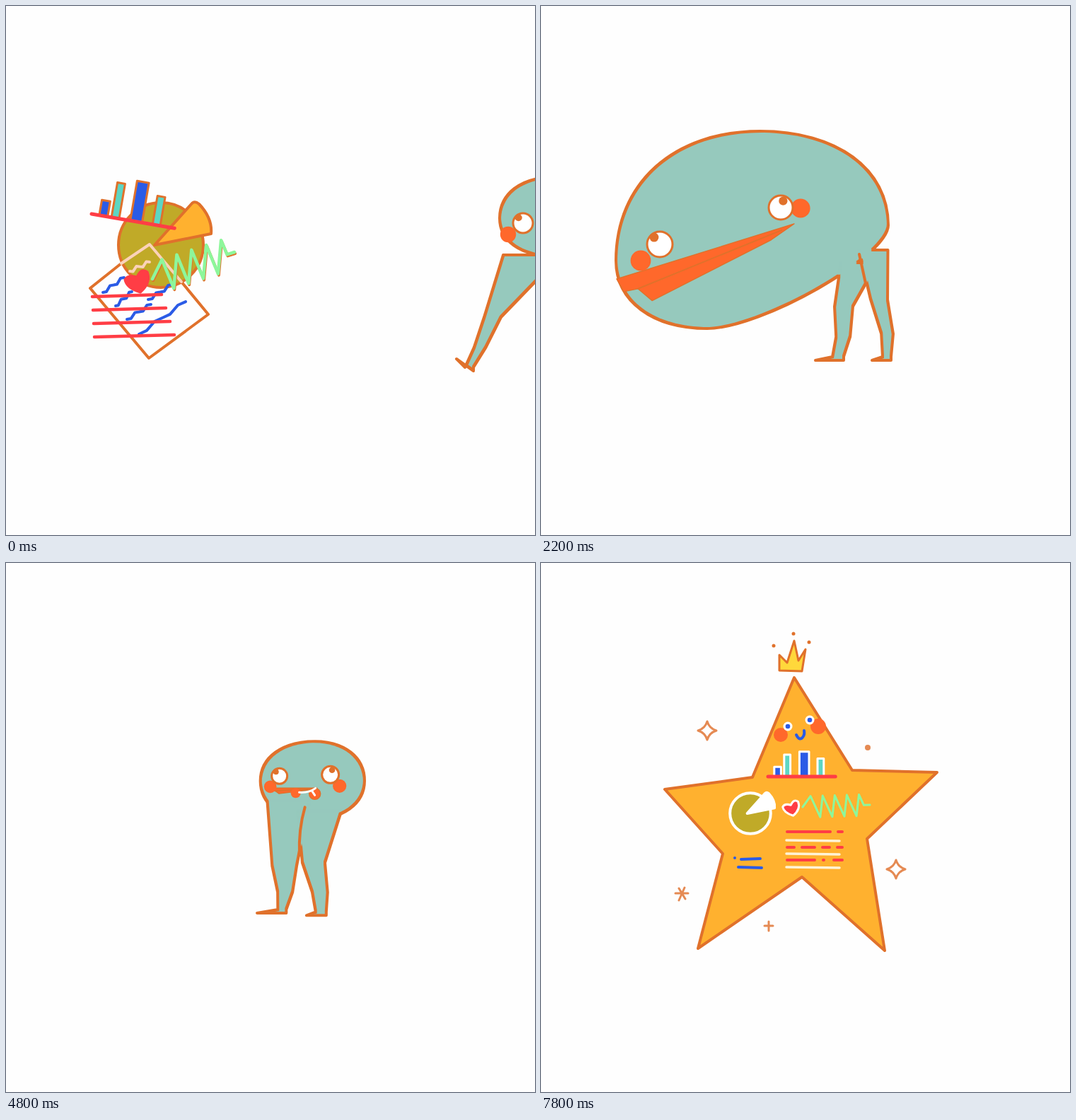
These frames come from a looping animation (748x748 px, 8000 ms). An HTML page:

```html
<!DOCTYPE html>
<html lang="en">
<head>
<meta charset="utf-8">
<title>Data to star</title>
<style>
html, body { margin: 0; width: 100%; height: 100%; overflow: hidden; background: #fefefe; }
svg { display: block; width: 100vw; height: 100vh; }
path, circle { vector-effect: non-scaling-stroke; }
</style>
</head>
<body>
<svg viewBox="0 0 748 748" stroke-linecap="round" stroke-linejoin="round">
  <filter id="inset" filterUnits="userSpaceOnUse" x="-400" y="-100" width="1600" height="1000" color-interpolation-filters="sRGB">
    <feMorphology operator="erode" radius="2"/>
  </filter>
  <g id="scene"></g>
</svg>
<script>
const LINE = '#e0712b', SOFT = '#e58a53', SKIN = '#96c9bd', HOT = '#ff682b', STAR = '#ffb12f', OLIVE = '#c0aa28',
  BLUE = '#2b5be6', RED = '#ff3d45', GREEN = '#8df79b', MINT = '#5dd6c3', PINK = '#fbd2b9', CREAM = '#fff3d6';
const STEP = 200, STEPS = 40;
const scene = document.getElementById('scene');

// Drawing helpers
const mix = (a, b, p) => a + (b - a) * p;
const path = (d, stroke, w = 4, fill = 'none') =>
  `<path d="${d}" stroke="${stroke}" stroke-width="${w}" fill="${fill}"/>`;
const line = (s, stroke, w) => path('M' + s, stroke, w);
const shape = (s, fill, stroke = 'none', w = 4) => path(`M${s}Z`, stroke, w, fill);
const dot = (x, y, r, fill, stroke = 'none', w = 3) =>
  `<circle cx="${x}" cy="${y}" r="${r}" fill="${fill}" stroke="${stroke}" stroke-width="${w}"/>`;
const group = (inner, transform) => `<g transform="${transform}">${inner}</g>`;
const about = (x, y, s, dy = 0) => `translate(${x} ${y + dy}) scale(${s}) translate(${-x} ${-y})`;

function scribble(x1, y1, x2, y2, amp = 3) {
  return Array.from({ length: 7 }, (_, i) =>
    [mix(x1, x2, i / 6), mix(y1, y2, i / 6) + amp * Math.sin(i * 2.1)]).join(' ');
}
function pulse(x1, y1, x2, y2, amp, beats = 5) {
  const out = [[x1, y1]], gap = (x2 - x1) * .18;
  const add = (x, dy) => out.push([x, mix(y1, y2, (x - x1) / (x2 - x1)) + dy]);
  for (let i = 0; i < beats; i++) {
    const x = x1 + gap * (.65 + i);
    add(x, -amp);
    if (i < beats - 1) add(x + gap * .8, amp);
  }
  add(x2 - gap * .5, 0);
  return [...out, [x2, y2]].join(' ');
}

// Infographics, shared by the loose pile and the star
const bars = (edge, w) => [[17, 22, 12, BLUE], [34, 50, 11, MINT], [64, 57, 17, BLUE], [93, 41, 11, MINT]]
  .map(([x, h, b, fill]) => shape(`${x - b / 2},0v${-h}h${b}v${h}`, fill, edge, w)).join('') + line('0,0 119,0', RED, 5);
const pie = (edge, wedge) => dot(0, 0, 60, OLIVE, edge, 4) +
  path('M-9 0L44 -59Q48 -63 54 -58Q73 -38 71 -16Z', edge, 4, wedge);
const heart = edge => path('M4 18Q-16 12 -18 0Q-14 -8 -1 -4Q5 -18 14 -11Q20 4 4 18Z', edge, 3, RED);

const beat = pulse(207, 386, 323, 348, 23);
const notes = [[137, 405, 167, 384], [155, 424, 178, 404], [171, 443, 205, 422], [201, 415, 235, 394], [188, 464, 254, 418]];
const data = [
  group(pie(LINE, STAR), 'translate(219 338)'),
  line('163,364 119,399 202,498 286,436 248,390', LINE),
  line('163,364 203,337 248,390', PINK),
  line(scribble(175, 375, 203, 362), PINK),
  ...notes.map(n => line(scribble(...n), BLUE, 4)),
  ...[0, 1, 2, 3].map(i => line(`${122 + i},${411 + 19 * i} ${220 + 6 * i},${408 + 19 * i}`, RED, 4.5)),
  group(heart(RED), 'translate(186 387)'),
  group(line(beat, LINE, 4), 'translate(1 2)'), line(beat, GREEN, 4.5),
  group(bars(LINE, 3), 'translate(121 294) rotate(9.8)')
].join('');

const textRow = i => i % 2
  ? line(`347,${381 + 10 * i} 423,${382 + 10 * i}`, CREAM, 3.5)
  : `<path d="M348 ${381 + 10 * i}L425 ${380 + 10 * i}" stroke="${RED}" stroke-width="4" stroke-dasharray="${i === 2 ? '12 9' : '${0}'}"/>`;
const redRow = (y, dashes) =>
  `<path d="M348 ${y}H426" fill="none" stroke="${RED}" stroke-width="4" stroke-dasharray="${dashes}"/>`;
const bigStar = [
  shape('358,162 440,293 560,296 461,390 486,548 369,444 222,545 257,411 175,320 299,303', STAR, LINE),
  dot(339, 243, 10, HOT), dot(392, 231, 11, HOT),
  ...[[349, 231], [380, 222]].map(([x, y]) => dot(x, y, 6.5, '#fff') + dot(x, y, 3.3, BLUE)),
  path('M361 243Q366 253 371 245Q373 242 372 237', BLUE, 4),
  group(bars('#fff', 3), 'translate(321 302) scale(.8 .62)'),
  group(pie('#fff', '#fff'), 'translate(296 354) scale(.48)'),
  group(heart('#fff'), 'translate(354 345) scale(.68)'),
  line(pulse(370, 345, 465, 342, 15), GREEN, 3),
  ...[0, 1, 2].map(i => line(`347,${392 + 19 * i} 422,${393 + 19 * i}`, CREAM, 3.5)),
  redRow(380, '61 11'), redRow(402, '10 11 18 11'), redRow(420, '39 12 1 14'),
  line('274,417 274,417', BLUE, 4), line('283,419 310,418', BLUE, 4), line('279,430 312,431', BLUE, 4)
].join('');

function glint(x, y, r = 13) {
  const c = r * .23;
  return path(`M0 ${-r}Q${c} ${-c} ${r} 0Q${c} ${c} 0 ${r}Q${-c} ${c} ${-r} 0Q${-c} ${-c} 0 ${-r}Z`, SOFT, 3)
    .replace('<path', `<path transform="translate(${x} ${y})"`);
}
const glory = shape('337,152 337,130 348,141 358,110 364,138 374,122 369,153', '#ffd83b', LINE, 3) +
  dot(357, 100, 2.5, LINE) + dot(379, 112, 2.5, LINE) + dot(329, 117, 2.5, LINE) +
  glint(235, 237) + glint(502, 433) + dot(462, 261, 4, SOFT) +
  path('M190 467H208M203 459L195 477M195 460L204 475M316 513H328M322 507V520', SOFT, 3);

const starPoints = Array.from({ length: 10 }, (_, i) => {
  const a = (i * 36 - 69) * Math.PI / 180, r = i % 2 ? 30 : 58;
  return [340 + r * Math.cos(a), 370 + r * Math.sin(a)].map(v => v.toFixed(1));
}).join(' ');
const smallStar = shape(starPoints, STAR, LINE) + dot(338, 345, 5, HOT) + dot(360, 352, 6, HOT) +
  [346, 357].map(x => dot(x, 343, 4, '#fff') + dot(x, 343, 1.7, BLUE)).join('') + dot(347, 353, 3.5, BLUE);
const tremble = [scribble(309, 249, 347, 268, 2), '360,275 361,277', '187,311 183,318 186,325',
  '181,338 178,345', '172,362 169,367', '192,491 195,490'].map(s => line(s, SOFT, 3.5)).join('');

// Poses. head: left, top, right, bottom points and lower-right roundness.
// leg: x, y, width at hip, knee and ankle, then shin bend, toe length, toe lift.
// eye (x, y, radius, cheek offset) and mouth are relative to the top of the head.
const stand = {
  dx: [0],
  head: [394, 300, 470, 242, 537, 298, 466, 353, .65],
  legL: [455, 349, 54, 431, 420, 24, 422, 496, 17, 2, 15, 0],
  legR: [480, 347, 42, 480, 418, 26, 494, 496, 11, 2, 16, 0],
  crease: [457, 355, 464, 365, 463, 382],
  eyeL: [-62, 66, 10, -7, 13], eyeR: [-11, 61, 12, 17, 15],
  mouth: [-65, 94, -15, 83, 5]
};
const enter = {
  ...stand, dx: [304], eyeL: [-43, 65, 14, -21, 16],
  legL: [440, 352, 82, 384, 440, 24, 351, 511, 12, 2, 12, 17]
};
const full = {
  dx: [0],
  head: [106, 360, 310, 177, 491, 310, 235, 456, .3],
  legL: [450, 363, 52, 428, 425, 26, 420, 496, 16, 4, 24, 0],
  legR: [470, 345, 41, 478, 415, 24, 489, 496, 12, 5, 15, 0],
  crease: [450, 351, 453, 365, 459, 392],
  eyeL: [-142, 160, 18, -27, 23], eyeR: [29, 108, 17, 28, 1],
  mouth: [-203, 209, 48, 131, 42]
};
const happy = {
  dx: [0],
  head: [408, 305, 480, 248, 550, 303, 475, 358, .6],
  legL: [439, 322, 57, 428, 428, 31, 421, 490, 11, 3, 28, 0],
  legR: [478, 345, 72, 472, 418, 35, 488, 495, 14, 3, 16, 0],
  crease: [443, 360, 449, 380, 449, 398],
  eyeL: [-50, 49, 11, -13, 15], eyeR: [22, 47, 12, 13, 16],
  mouth: [-64, 66, 3, 66, 7]
};
const back = {
  ...happy,
  head: [263, 315, 350, 261, 421, 318, 342, 372, .6],
  legL: [320, 362, 66, 325, 430, 42, 329, 490, 14, 3, 32, 0],
  legR: [374, 361, 42, 361, 436, 26, 360, 490, 17, 2, 7, 0],
  crease: [382, 316, 342, 372, 347, 444]
};
const bend = {
  ...happy,
  head: [205, 322, 290, 260, 371, 318, 262, 366, .35],
  legL: [228, 335, 55, 204, 413, 40, 215, 486, 11, 16, 9, 0],
  legR: [336, 330, 66, 349, 417, 43, 327, 492, 17, -3, 1, 0],
  crease: [320, 310, 320, 330, 317, 345]
};
const keys = [[0, enter], [4, stand], [6, stand], [10, full], [11, full], [18, happy], [22, happy],
  [28, back], [30, bend], [36, bend]];

function poseAt(k) {
  let i = 0;
  while (i < keys.length - 2 && k >= keys[i + 1][0]) i++;
  const [t0, a] = keys[i], [t1, b] = keys[i + 1];
  let p = (k - t0) / (t1 - t0);
  if (b === happy) p = 1 - (1 - p) ** 1.6;
  const out = {};
  for (const part in a) out[part] = a[part].map((v, j) => mix(v, b[part][j], p));
  const walking = k < 4 || k > 22 && k < 28;
  if (walking && k % 2) {
    out.legL[6] -= 8;
    out.legR[6] += 8;
    out.head[3] -= 9;
  }
  if (k === 2 || k === 22) out.head[3] -= 24;
  if (k > 30 && k % 2) out.head[2] += 3;
  return out;
}

function headPath([lx, ly, tx, ty, rx, ry, bx, by, k]) {
  // Each quarter leaves and arrives along the axes.
  const turn = (x0, y0, x1, y1, vertical, r = .6) => vertical
    ? `C${x0} ${mix(y0, y1, r)} ${mix(x1, x0, r)} ${y1} ${x1} ${y1}`.replace(mix(x1, x0, r), mix(x1, x0, r))
    : `C${mix(x0, x1, r)} ${y0} ${x1} ${mix(y1, y0, r)} ${x1} ${y1}`;
  return `M${lx} ${ly}` + turn(lx, ly, tx, ty, true) + turn(tx, ty, rx, ry, false) +
    turn(rx, ry, bx, by, true, k) + turn(bx, by, lx, ly, false) + 'Z';
}

function legPath([hx, hy, hw, kx, ky, kw, ax, ay, aw, bend, toe, lift]) {
  const shin = [mix(kx, ax, .6) + bend, mix(ky, ay, .6), mix(kw, aw, .6)];
  const rows = [[hx, hy, hw], [kx, ky, kw], shin, [ax, ay, aw]];
  const side = s => rows.map(([x, y, w]) => [x + s * w / 2, y]);
  const foot = [[ax - aw / 2 - toe, ay + 5 - lift], [ax + aw / 2, ay + 5]];
  return 'M' + [...side(-1), ...foot, ...side(1).reverse()].join(' ') + 'Z';
}

function drawEye([x, y, r, cx, cy], look) {
  return dot(x + cx, y + cy, r * .8, HOT) + dot(x, y, r, '#fff', LINE) +
    dot(x + look * r, y - r * .55, r * .36, LINE);
}

function drawMouth([x1, y1, x2, y2, drop], gape) {
  const at = (p, d) => [mix(x1, x2, p), mix(y1, y2, p) + d * drop];
  const lower = [at(.87, .3), at(.2, 1.1 + gape * .7), at(.12, .55 + gape * .5), at(.04, .5)];
  return shape([at(0, -gape), at(1, 0), ...lower].join(' '), HOT, LINE, 1.5) +
    line([lower[2], at(.93, .08)].join(' '), LINE, 2);
}

const bump = (k, from, to) => k > from && k < to ? Math.sin((k - from) / (to - from) * Math.PI) : 0;

function drawCreature(k) {
  const p = poseAt(k);
  const parts = [headPath(p.head), legPath(p.legL), legPath(p.legR)];
  const [sx, sy, cx, cy, ex, ey] = p.crease;
  let out = parts.map(d => path(d, LINE, 4, LINE)).join('') +
    `<g filter="url(#inset)">${parts.map(d => path(d, SKIN, 4, SKIN)).join('')}</g>`.replace(/stroke-width="4"/g, 'stroke-width="0"') +
    path(`M${sx} ${sy}Q${cx} ${cy} ${ex} ${ey}`, LINE);
  if (k < 25) {
    const chew = k > 12 && k < 18 && k % 2 ? .25 : 0;
    let face = k > 6 ? drawMouth(p.mouth, bump(k, 6, 11) + chew) : '';
    face += drawEye(p.eyeL, -.45) + drawEye(p.eyeR, .2);
    if (k > 17) face += dot(-27, 73, 7, HOT) + dot(0, 74, 8, HOT, LINE, 1.5) + path('M-22 72Q-8 73 1 66M-4 70L0 76', '#fff', 3);
    out += group(face, `translate(${p.head[2]} ${p.head[3]})`);
  }
  return group(group(out, `translate(${p.dx[0]} 0)`), about(450, 500, 1 + .08 * bump(k, 6, 11)));
}

function draw(k) {
  let out = k < 36 ? drawCreature(k) : '';
  if (k < 10) out += group(data, about(205, 365, Math.min(1, 1 - (k - 7) * .35)));
  if (k > 30 && k < 36) {
    out += tremble;
    if (k > 31) out += group(smallStar, about(350, 340, Math.min(1, .4 + (k - 32) * .3), k === 35 ? 36 : 0));
  }
  if (k > 35) out += group(bigStar, about(366, 360, Math.min(1, .62 + (k - 36) * .22)));
  if (k > 37) out += glory;
  scene.innerHTML = out;
}

let shown = -1;
const start = performance.now();
function tick(now) {
  const k = Math.floor(Math.max(0, now - start) / STEP) % STEPS;
  if (k !== shown) draw(shown = k);
  requestAnimationFrame(tick);
}
tick(start);
</script>
</body>
</html>
```
